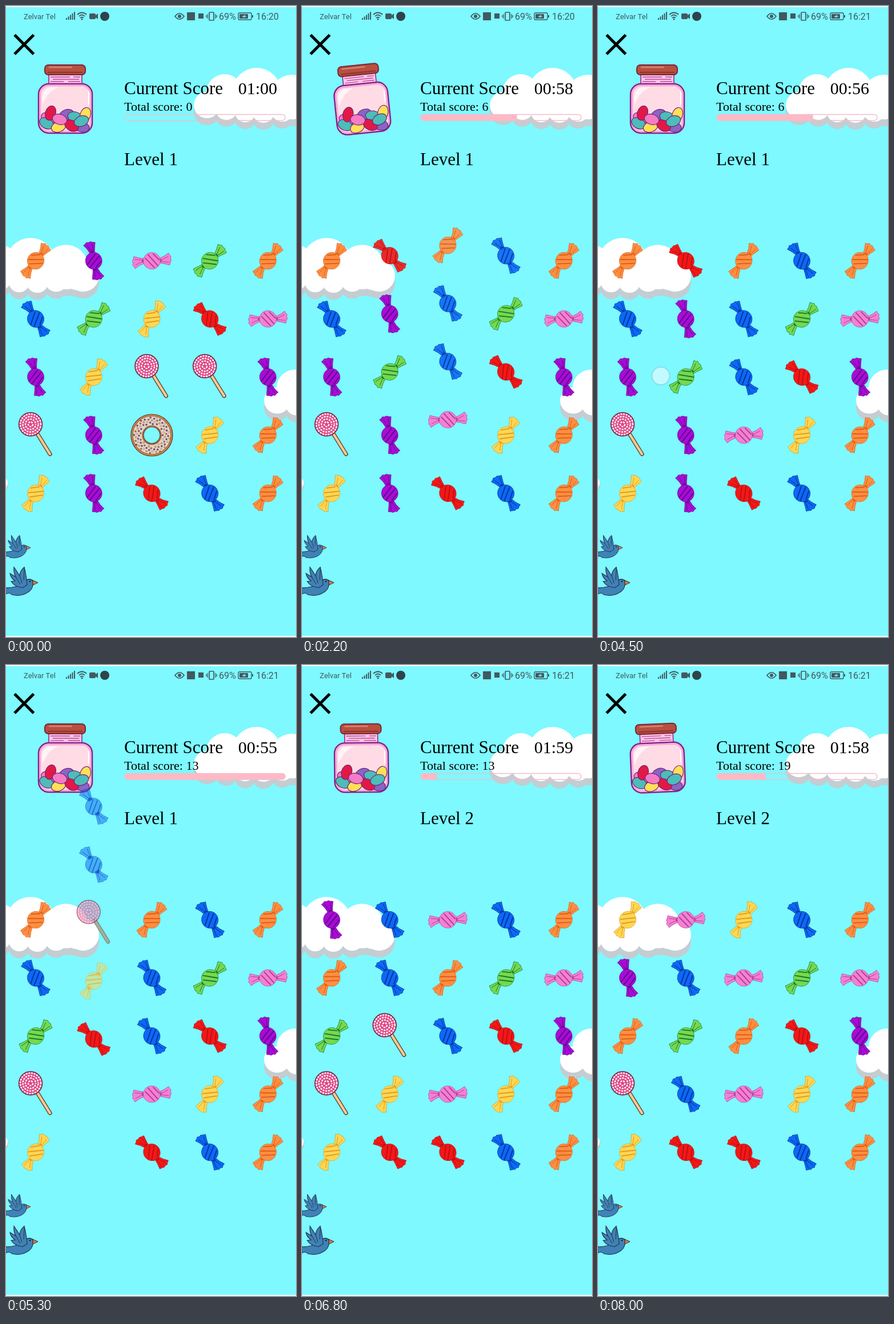
An HTML page with a canvas that plays this animation: 508x1102 px, repeating every 8100 ms.

```html
<!DOCTYPE html>
<html lang="en">
<head>
<meta charset="utf-8">
<title>Candy board</title>
<style>
html, body { margin: 0; width: 100%; height: 100%; overflow: hidden; background: #7df9ff; }
canvas { display: block; width: 508px; height: 1102px; }
</style>
</head>
<body>
<canvas id="stage" width="508" height="1102"></canvas>
<script>
const ctx = document.getElementById('stage').getContext('2d');
const LOOP = 8100, TAU = Math.PI * 2;
const SWAP_AT = 4550, LEVEL_AT = 5400;
const POP_END = 400, FALL_END = 900;

// Kind: [angle in degrees, fill, dark]
const CANDY = {
  O: [-51, '#ff8e41', '#d95c16'],
  P: [78, '#a90bd6', '#5b0a87'],
  K: [-3, '#f580d1', '#a93a96'],
  G: [-42, '#74d950', '#17772c'],
  B: [60, '#0b69f6', '#0b2f96'],
  Y: [-57, '#ffd751', '#dd9a26'],
  R: [48, '#f21818', '#bd0d12']
};

const clamp = v => Math.max(0, Math.min(1, v));
const easeOut = v => 1 - (1 - clamp(v)) ** 2;
const mix = (a, b, v) => a + (b - a) * v;

function at(x, y, angle, scale, draw) {
  ctx.save();
  ctx.translate(x, y);
  ctx.rotate(angle * Math.PI / 180);
  ctx.scale(scale, scale);
  draw();
  ctx.restore();
}

function paint(path, fill, stroke, width = 1) {
  if (fill) { ctx.fillStyle = fill; ctx.fill(path, 'evenodd'); }
  if (stroke) { ctx.strokeStyle = stroke; ctx.lineWidth = width; ctx.stroke(path); }
}
const shape = (d, fill, stroke, width) => paint(new Path2D(d), fill, stroke, width);

function oval(x, y, rx, ry, fill, stroke, width, tilt = 0) {
  const p = new Path2D();
  p.ellipse(x, y, rx, ry, tilt, 0, TAU);
  paint(p, fill, stroke, width);
}
const disc = (x, y, r, fill, stroke, width) => oval(x, y, r, r, fill, stroke, width);

function box(x, y, w, h, r, fill, stroke, width) {
  const p = new Path2D();
  p.roundRect(x, y, w, h, r);
  paint(p, fill, stroke, width);
}

function label(text, x, y, size, align = 'left', family = '"Liberation Serif", serif', color = '#000') {
  ctx.font = `${size}px ${family}`;
  ctx.textAlign = align;
  ctx.fillStyle = color;
  ctx.fillText(text, x, y);
}

// ---- Board logic ----

function collapse(board, gone, fresh) {
  const next = board.map(row => [...row]), from = board.map(() => []);
  for (let c = 0; c < 5; c++) {
    const added = [...(fresh[c] || '')];
    const column = added.map((kind, i) => [kind, i - added.length]);
    board.forEach((row, r) => { if (!gone.has(`${r}${c}`)) column.push([row[c], r]); });
    column.forEach(([kind, start], r) => { next[r][c] = kind; from[r][c] = start; });
  }
  return { next, from };
}

let board = ['OPKGO', 'BGYRK', 'PYLLP', 'LPDYO', 'YPRBO'].map(row => [...row]);
const matches = [
  { time: 1450, cells: '12 21 22 23 32', fresh: { 1: 'R', 2: 'OBB', 3: 'B' }, bar: [0, .6] },
  { time: 4750, cells: '11 21 31 41', fresh: { 1: 'BBLY' }, bar: [.6, 1], swap: true },
  { time: 5760, cells: '10 11 12', fresh: { 0: 'P', 1: 'B', 2: 'K' }, bar: [0, .1] },
  { time: 7050, cells: '11 20 21 22 31', fresh: { 0: 'Y', 1: 'KBG', 2: 'Y' }, bar: [.1, .305] }
];
for (const m of matches) {
  m.before = board.map(row => [...row]);
  if (m.swap) m.before[2].splice(0, 2, board[2][1], board[2][0]);
  m.gone = new Set(m.cells.split(' '));
  Object.assign(m, collapse(m.before, m.gone, m.fresh));
  board = m.next;
}
const lastMatch = t => matches.filter(m => t >= m.time).pop();

// ---- Pieces ----

function candy([angle, fill, dark]) {
  ctx.rotate(angle * Math.PI / 180);
  ctx.lineJoin = 'round';
  for (const side of [0, Math.PI]) {
    ctx.save();
    ctx.rotate(side);
    shape('M12-3L22-7 30-12Q31-8 34-6Q32-2 34 1Q32 4 31 9L21 6 12 4Z', fill, dark, .7);
    shape('M16 0L29-6M16 2L30 4', null, dark, .9);
    shape('M12-3L17-2 17 3 12 4Z', dark);
    ctx.restore();
  }
  oval(0, 0, 15, 14.5, fill, dark, .6);
  ctx.lineCap = 'round';
  shape('M-11-5L4 12M-6-11L10 9M3-12L13-1', null, dark, 1.8);
}

function lollipop() {
  ctx.lineCap = 'round';
  shape('M2-4L25 33', null, '#4b2a2c', 7);
  shape('M2-4L25 33', null, '#f6c98c', 4.5);
  ctx.lineCap = 'butt';
  disc(-9, -19, 20.5, '#dc4483', '#6b2440', 1.4);
  [4, 9, 13.5, 18].forEach((r, i) => {
    ctx.setLineDash([3.2, 1.6]);
    ctx.lineDashOffset = i * 2;
    disc(-9, -19, r, null, '#fff1f5', 2.6);
  });
  ctx.setLineDash([]);
}

function donut() {
  const ring = (outer, inner, fill, stroke) => {
    const p = new Path2D();
    p.arc(0, 0, outer, 0, TAU);
    p.moveTo(inner, 0);
    p.arc(0, 0, inner, 0, TAU);
    paint(p, fill, stroke, 1.2);
  };
  ring(36.5, 14.5, '#e08a45', '#5a3023');
  ring(33.5, 16.5, '#e3d5c4', '#8a5740');
  const colors = ['#b8326b', '#f4d552', '#5a479c', '#fff', '#d8762f'];
  for (let i = 0; i < 80; i++) {
    const r = Math.sqrt(mix(19 ** 2, 32 ** 2, i / 79)), a = i * 2.4;
    disc(r * Math.cos(a), r * Math.sin(a), 1.4, colors[i % 5], '#62404c', .6);
  }
}

function piece(kind, row, col, scale = 1, alpha = 1) {
  if (scale <= 0) return;
  ctx.globalAlpha = alpha;
  at(52 + 101.7 * col, 445 + 101.5 * row, 0, scale, () => {
    if (kind === 'L') lollipop();
    else if (kind === 'D') donut();
    else candy(CANDY[kind]);
  });
  ctx.globalAlpha = 1;
}

const eachCell = (cells, draw) => cells.forEach((row, r) => row.forEach((kind, c) => draw(kind, r, c)));

function drawBoard(t) {
  const m = lastMatch(t);
  if (!m) {
    eachCell(matches[0].before, (kind, r, c) => piece(kind, r, c));
    return;
  }
  const age = t - m.time;
  if (age < POP_END) {
    const scale = age < 250 ? 1 + .12 * easeOut(age / 200) : 1.12 * (1 - (age - 250) / 150);
    eachCell(m.before, (kind, r, c) => piece(kind, r, c, m.gone.has(`${r}${c}`) ? scale : 1));
    return;
  }
  const fall = easeOut((age - POP_END) / (FALL_END - POP_END));
  const swap = m === matches[0] ? easeOut((t - SWAP_AT) / 180) : 0;
  eachCell(m.next, (kind, r, c) => {
    const start = m.from[r][c];
    const col = r === 2 && c < 2 ? mix(c, 1 - c, swap) : c;
    piece(kind, mix(start, r, fall), col, 1, start < 0 ? fall : 1);
  });
}

// ---- Scenery ----

const PUFFS = [[23, 65, 23], [54, 43, 32], [110, 43, 43], [172, 51, 39], [202, 66, 28],
  [57, 72, 19], [90, 77, 18], [122, 77, 19], [155, 74, 20], [190, 72, 19]];

function cloud(x, y) {
  for (const [dy, color] of [[12, '#c4cdd1'], [0, '#fff']]) {
    for (const [px, py, r] of PUFFS) disc(x + px, y + py + dy, r, color);
  }
}

function bird(x, y, scale) {
  at(x, y, 0, scale, () => {
    const line = '#27324d', blue = '#3f82b6';
    shape('M0 0L-11-5-10 5Z', '#d97a35', line, 1);
    shape('M-9-3Q-15-9-22-3C-30 6-46 10-58 9L-58 21Q-50 16-46 21C-28 26-9 16-9 3Z', blue, line, 1.2);
    shape('M-19 4Q-20-10-24-27Q-32-20-32-12L-42-27Q-43-17-39-10L-49-16Q-47-7-40-3L-47-2Q-40 8-27 9Z', blue, line, 1.2);
    shape('M-24-24L-25-4M-32-12L-28 1M-39-10L-31 3', null, line, 1);
    disc(-14, -2, 1.2, '#111');
  });
}

const BEANS = [[74, 196, 'p'], [106, 190, 'v'], [121, 194, 't'], [139, 190, 'y'], [71, 205, 't'],
  [92, 211, 'y'], [133, 211, 'v'], [78, 187, 'r'], [115, 209, 'r'], [132, 201, 't'], [94, 198, 'p']];
const BEAN_COLORS = { p: '#f57bc6', v: '#8b64c5', t: '#4cbdb9', y: '#ffe056', r: '#e31847' };

function jar(angle) {
  const purple = '#87208e';
  at(104, 162, angle, 1, () => {
    ctx.translate(-104, -162);
    box(75, 119, 58, 20, 3, '#ffc7e2', purple, 1.5);
    shape('M78 124H112M118 124H130M82 128H128M78 132H101M109 132H130', null, '#b34aa7', 1.3);
    box(57, 136, 94, 86, 18, '#ffdce5', purple, 2.5);
    box(60, 139, 88, 80, 15, null, '#f9a6d5', 2.5);
    shape('M63 162Q64 144 78 142L92 142Q72 149 64 173Z', '#fff5f8');
    BEANS.forEach(([x, y, c], i) =>
      oval(x, y, 13, 9, BEAN_COLORS[c], '#702576', 1.2, [.5, -.35, .25, 1.9][i % 4]));
    shape('M145 150V172', null, '#fff', 2);
    box(68, 103, 71, 17, 6, '#b7503f', '#7b243d', 2);
    shape('M75 107H116', null, '#d58372', 2.5);
    shape('M73 116H134', null, '#93372f', 2.5);
  });
}

function statusBar(clock) {
  const ink = '#435860', sans = 'Roboto, sans-serif';
  label('Zelvar Tel', 31, 22.5, 13, 'left', sans, ink);
  ctx.fillStyle = ink;
  for (let i = 0; i < 5; i++) ctx.fillRect(105 + i * 3.5, 21 - i * 2.7, 2, 3 + i * 2.7);
  ctx.lineCap = 'butt';
  shape('M125 15Q133 8 141 15M128 18Q133 13 138 18M130 21Q133 18 136 21', null, ink, 1.7);
  disc(133, 23, 1.5, ink);
  box(146, 13, 11, 10, 2, ink);
  shape('M156 17L161 13V23L156 19Z', ink);
  disc(173, 18, 8, '#30434b');
  shape('M296 18Q304 8 312 18Q304 28 296 18Z', null, ink, 1.7);
  disc(304, 18, 3, ink);
  box(317, 11, 14, 14, 0, ink);
  box(337, 13, 9, 9, 0, ink);
  box(356, 11, 8, 14, 1, null, ink, 1.7);
  shape('M353 14V22M351 16V20M367 14V22M369 16V20', null, ink, 1.3);
  label('69%', 373, 23.5, 16, 'left', sans, ink);
  box(407, 12, 23, 12, 2, null, ink, 1.4);
  box(409, 14, 15, 8, 1, ink);
  shape('M413 19L420 15 418 18H422L415 21 417 19Z', '#7df9ff');
  ctx.fillStyle = ink;
  ctx.fillRect(431, 16, 2, 4);
  label(clock, 438, 23.5, 16, 'left', sans, ink);
}

// ---- Score panel ----

function timerText(t) {
  const left = t < LEVEL_AT ? 60 - Math.floor(t / 1000) : 120 - Math.floor((t - LEVEL_AT) / 1000);
  return [Math.floor(left / 60), left % 60].map(n => String(n).padStart(2, '0')).join(':');
}

function barValue(t) {
  const m = lastMatch(t);
  if (!m || (m.swap && t >= LEVEL_AT)) return 0;
  return mix(...m.bar, easeOut((t - m.time - 60) / 280));
}

function wobble(t) {
  const m = lastMatch(t);
  const age = m ? t - m.time : 1150;
  return age < 1150 ? 18.5 * (1 - age / 1150) * Math.sin(TAU * age / 1100) : 0;
}

function scorePanel(t) {
  const total = t < 1550 ? 0 : t < 4850 ? 6 : t < 7150 ? 13 : 19;
  label('Current Score', 207, 154, 31);
  label(timerText(t), 475, 154, 30, 'right');
  label(`Total score: ${total}`, 207, 183, 22);
  label(`Level ${t < LEVEL_AT ? 1 : 2}`, 254, 278, 31, 'center');
  const width = 281 * barValue(t);
  if (width > 0) {
    ctx.save();
    ctx.beginPath();
    ctx.roundRect(208, 189, 281, 11, 5);
    ctx.clip();
    ctx.fillStyle = '#ffb9c6';
    ctx.fillRect(208, 189, width, 11);
    ctx.restore();
  }
  box(208, 189.5, 281, 10.5, 5, null, '#f3bdc8', 1.4);
}

function render(t) {
  ctx.fillStyle = '#7df9ff';
  ctx.fillRect(0, 0, 508, 1102);
  cloud(329, 108);
  cloud(-67, 405);
  cloud(452, 624);
  disc(-9, 836, 13, '#c4cdd1');
  disc(-9, 833, 12, '#fff');
  bird(43, 946, .8);
  bird(56, 1007, 1);
  statusBar(t < 3300 ? '16:20' : '16:21');
  ctx.lineCap = 'butt';
  shape('M15 50.5L48.5 84M48.5 50.5L15 84', null, '#000', 5);
  jar(wobble(t));
  scorePanel(t);
  drawBoard(t);
  if (t >= 4450 && t < 4650) {
    const x = mix(110, 150, clamp((t - 4510) / 140));
    disc(x, 646, 15.5, '#d5faffcc', '#8fd3df', 1.5);
  }
  ctx.fillStyle = '#f4fbfb';
  ctx.fillRect(0, 0, 508, 2);
  ctx.fillRect(0, 1100, 508, 2);
}

const begin = performance.now();
function tick() {
  render((performance.now() - begin) % LOOP);
  requestAnimationFrame(tick);
}
tick();
</script>
</body>
</html>
```
